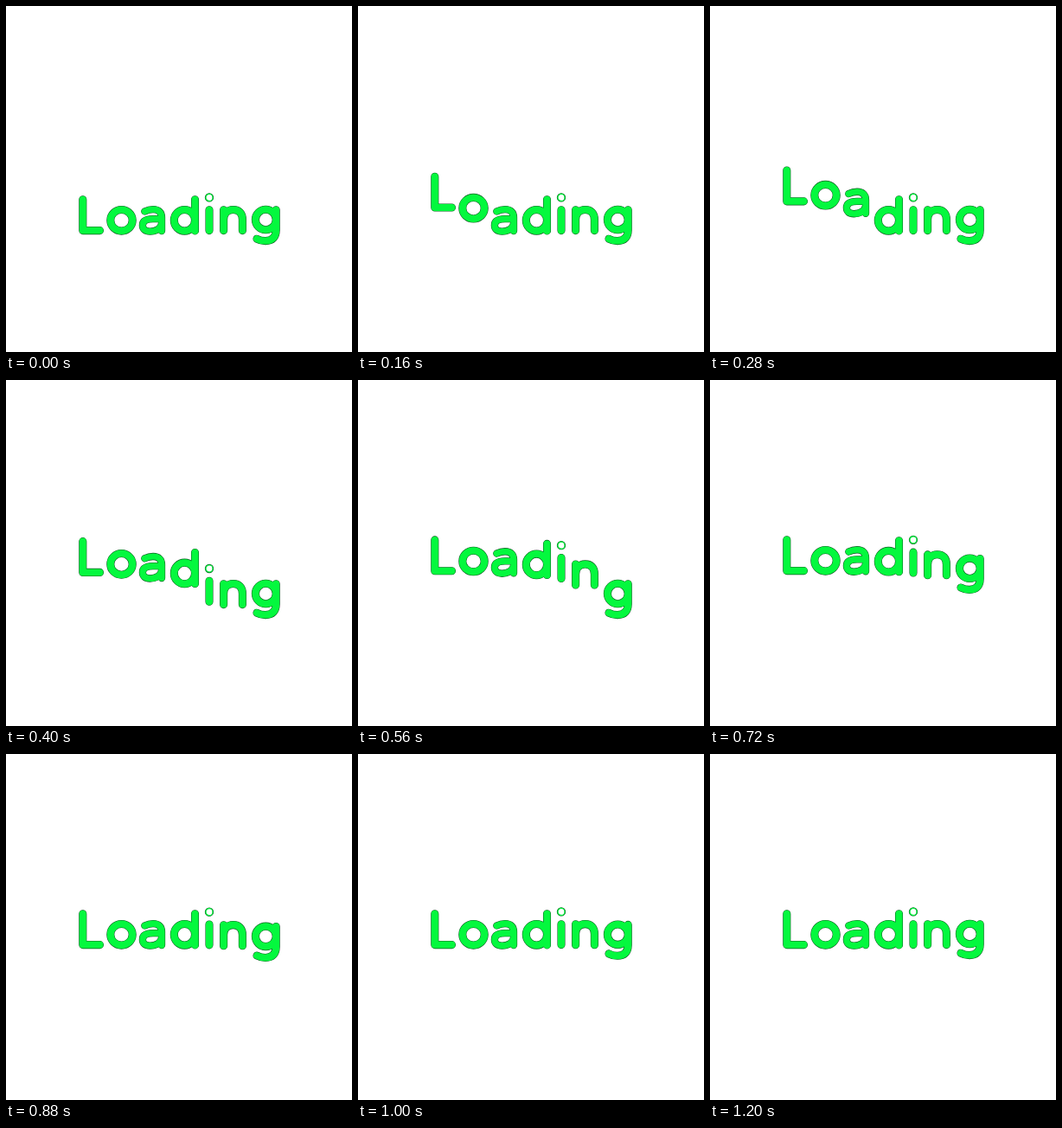
Write an HTML page that moves like this. It is 400 px wide and 400 px high and loops after 1280 ms.

```html
<!DOCTYPE html>
<html lang="en">
<head>
<meta charset="utf-8">
<title>Loading</title>
<style>
html, body { margin: 0; width: 100%; height: 100%; overflow: hidden; background: #fff; }
svg { display: block; width: 100%; height: 100%; }
path { fill: none; stroke-linecap: round; stroke-linejoin: round; }
.edge { stroke: #0b5a20; stroke-width: 9.1px; }
.face { stroke: #04f83e; stroke-width: 8px; }
.thin .edge { stroke-width: 8.3px; }
.thin .face { stroke-width: 7.2px; }
</style>
</head>
<body>
<svg id="stage" viewBox="0 0 400 400" role="img" aria-label="Loading"></svg>
<script>
const LOOP = 1280, STEP = 40, LAST = 1200;
const START = 48, STAGGER = 87.7, RISE = 560, HEIGHT = 39;

const ring = (cx, cy, rx, ry) =>
  `M${cx - rx} ${cy}a${rx} ${ry} 0 1 1 ${2 * rx} 0a${rx} ${ry} 0 1 1 ${-2 * rx} 0z`;

// Centre lines of the rounded letters
const glyphs = [
  { d: 'M88.8 223.8V259.6H108.5' },
  { d: ring(133.5, 247.8, 12.7, 12.3) },
  { d: 'M160.3 237.4C164 235.6 167 235.1 170 235.1C176.5 235.1 180 238.5 180 244.6V260.1' +
       'M180 246.2H170C162 246.2 157.9 248.7 157.9 253.7C157.9 258 161 260.6 166.5 260.6' +
       'C173 260.6 179.5 257.4 180 251', thin: true },
  { d: ring(206.4, 247.8, 12.1, 12.3) + 'M218.5 223.8V259.9' },
  { d: ring(235, 221.4, 0.6, 0.6) + 'M235 235.7V259.6' },
  { d: 'M251.6 235.7V259.6M251.6 247C251.6 240 256 235.5 262.6 235.5' +
       'C269.6 235.5 273.4 239.7 273.4 247V259.6' },
  { d: ring(300.3, 247, 11.9, 11.7) +
       'M312.2 235.7V259C312.2 267.6 307.7 271.6 300 271.6C296 271.6 293 270.8 290 269.2' }
];

const svgNode = (tag, attrs, parent) => {
  const node = document.createElementNS('http://www.w3.org/2000/svg', tag);
  for (const key in attrs) node.setAttribute(key, attrs[key]);
  return parent.appendChild(node);
};

const stage = document.getElementById('stage');
const letters = glyphs.map(({ d, thin }) => {
  const group = svgNode('g', { class: thin ? 'thin' : '' }, stage);
  svgNode('path', { d, class: 'edge' }, group);
  svgNode('path', { d, class: 'face' }, group);
  return group;
});

// Cubic bezier (0, .7, .4, 1), solved for x by bisection
function ease(x) {
  if (x <= 0) return 0;
  if (x >= 1) return 1;
  let lo = 0, hi = 1;
  for (let i = 0; i < 24; i++) {
    const s = (lo + hi) / 2;
    if (1.2 * s * s - 0.2 * s ** 3 < x) lo = s; else hi = s;
  }
  const r = 1 - lo;
  return 2.1 * r * r * lo + 3 * r * lo * lo + lo ** 3;
}

function draw(ms) {
  const t = Math.min(LAST, Math.floor((ms % LOOP) / STEP) * STEP);
  letters.forEach((letter, i) => {
    const y = -HEIGHT * ease((t - START - i * STAGGER) / RISE);
    letter.setAttribute('transform', `translate(0 ${y.toFixed(2)})`);
  });
}

const begin = performance.now();
function tick() {
  draw(performance.now() - begin);
  requestAnimationFrame(tick);
}
tick();
</script>
</body>
</html>
```
